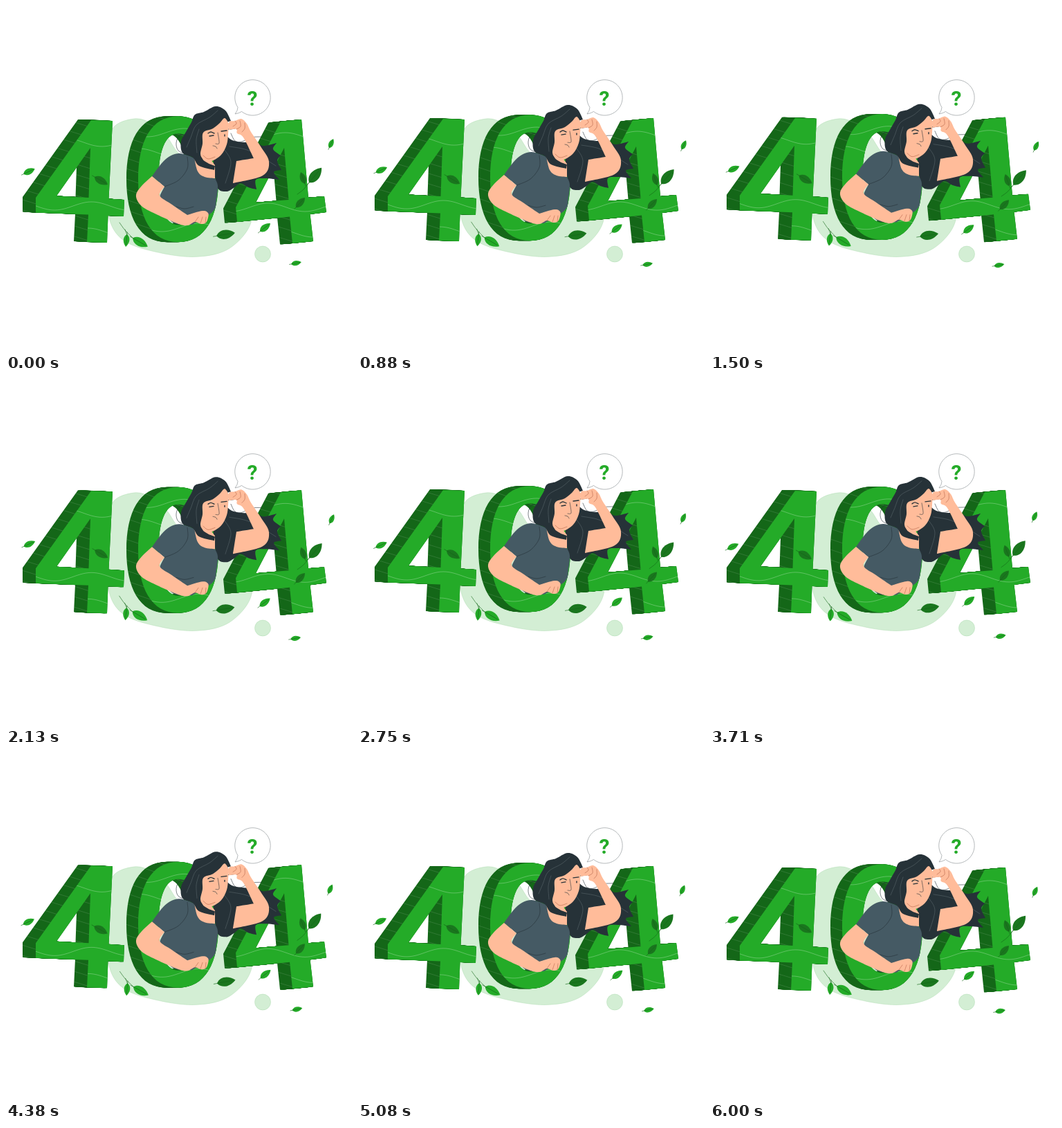
These frames come from a looping animation (500 by 500 pixels, 6040 ms). An HTML page:

```html
<!DOCTYPE html>
<html lang="en">
<head>
<meta charset="utf-8">
<title>404</title>
<style>
  html, body { margin: 0; width: 100%; height: 100%; overflow: hidden; background: #fff; }
  svg { display: block; width: 100vw; height: 100vh; }
  path { fill-rule: evenodd; clip-rule: evenodd; }
  .face { fill: #24ab28; }
  .side { fill: #146718; }
  .deep { fill: #1a761e; }
  .pale { fill: #d3eed4; stroke: #a5d6a8; stroke-width: .4; }
  .skin { fill: #ffbc9a; }
  .hair { fill: #263238; }
  .shirt { fill: #455a64; }
  .line, .brow, .wave, .grain, .shine, .crease, .stem { fill: none; stroke-width: .6; stroke-linecap: round; }
  .line { stroke: #263238; }
  .brow { stroke: #263238; stroke-width: 1.4; }
  .wave { stroke: #fff; opacity: .45; }
  .grain { stroke: #fff; opacity: .2; }
  .shine { stroke: #8b979c; opacity: .5; }
  .crease { stroke: #b5654a; }
  .stem { stroke: #146718; }
  text { font: 700 30px Roboto, sans-serif; fill: #24ab28; text-anchor: middle; }
</style>
</head>
<body>
<svg viewBox="0 0 500 500">
  <g id="back"></g>
  <circle class="pale" cx="371" cy="358.5" r="11.5"/>
  <path d="M340.500 152.500A25.700 25.700 0 1 0 335 146.500Q335 151 331 156Q337 155 340.500 152.500Z" fill="#fff" stroke="#6b7377" stroke-width=".5"/>
  <text x="356" y="143.700">?</text>
  <g id="float"></g>
  <g id="wind"></g>
</svg>
<script>
  const LOOP = 6040, RISE = 6.6;
  const [back, float, wind] = ['back', 'float', 'wind'].map(id => document.getElementById(id));

  // Smooth path through "x,y" points; "!" marks a sharp corner.
  function curve(text, closed) {
    const p = text.split(' ').flatMap(s => {
      const point = s.replace('!', '').split(',').map(Number);
      return s.endsWith('!') ? [point, point] : [point];
    });
    const n = p.length;
    const at = i => p[closed ? (i + n) % n : Math.max(0, Math.min(n - 1, i))];
    let d = `M${p[0]}`;
    for (let i = 0; i < (closed ? n : n - 1); i++) {
      const [a, b, c, e] = [at(i - 1), at(i), at(i + 1), at(i + 2)];
      if (b === c) continue;
      d += `C${b.map((v, k) => v + (c[k] - a[k]) / 6)} ${c.map((v, k) => v - (e[k] - b[k]) / 6)} ${c}`;
    }
    return d;
  }
  const path = (kind, d) => `<path class="${kind}" d="${d}"/>`;
  const shape = (kind, text) => path(kind, curve(text, true));
  const lines = (kind, ...texts) => path(kind, texts.map(t => curve(t)).join(''));

  const range = (from, to, step) =>
    Array.from({ length: Math.ceil((to - from) / step) }, (_, i) => from + i * step);

  // A digit: its face swept along (dx, dy) for depth, hatching on the side, waves on the face.
  function digit(id, d, dx, dy, left, right, rows) {
    const sweep = range(0, 1.01, .05).map(k =>
      `<path class="side" d="${d}" transform="translate(${dx * k} ${dy * k})"/>`).join('');
    const hatch = range(165, 350, 15).map(y => `M${left + dx} ${y - 20}L${right} ${y + 25}`).join('');
    const waves = rows.map(y => 'M' + range(left, right + 4, 4).map(x =>
      `${x} ${y + 6 * Math.sin((x - left) / 17 + y)}`).join('L')).join('');
    return `<clipPath id="${id}"><path d="${d}"/></clipPath>
      <clipPath id="${id}s"><path d="${d}" transform="translate(${dx} ${dy})"/></clipPath>
      ${sweep}<g clip-path="url(#${id}s)">${path('grain', hatch)}</g>
      ${path('face', d)}<g clip-path="url(#${id})">${path('wave', waves)}</g>`;
  }

  const four = 'M123 165L154 166L148.5 278.5L171 280L170 304L147.5 303L146 342L117 341L119 301.5L43 298.500V277Z' +
    'M122 205L73 274.5L119.5 277Z';
  const tilted = 'M397 167L427 164L437 277L460 275L463 298L439.5 301L444 340L414 343L410 304.5L334 312L332 291Z' +
    'M402 205L361 284L408.5 280Z';
  const oval = (x, y, rx, ry) => `M${x} ${y - ry}` + [[-1, 1], [1, -1]].map(([sx, sy]) =>
    `C${x + sx * rx * .68} ${y - sy * ry} ${x + sx * rx} ${y - sy * ry * .6} ${x + sx * rx} ${y}` +
    `S${x + sx * rx * .68} ${y + sy * ry} ${x} ${y + sy * ry}`).join('') + 'Z';
  const zero = oval(249, 250.3, 58, 91) + oval(249, 250.3, 28.5, 66);

  back.innerHTML = shape('pale',
    '185,163 211,170 232,188 248,211 275,231 325,254 354,288 350,322 318,353 270,362.5 215,355 172,340 151,313 147,270 146,220 154,177');

  float.innerHTML =
    digit('a', four, -19, -1, 43, 171, [197, 289, 327]) +
    digit('c', tilted, -18, 1.5, 332, 463, [189, 291, 328]) +
    digit('b', zero, -17, 0, 191, 307, [183, 212, 320]) +

    // hair behind the shoulder
    lines('line', '263,186 251,187 246,198 249,209 260,214', '325,184 331,195 341,196 353,190 369,189') +
    shape('hair', '315,184! 327,194 345,197 360,195 371,202 391,198! 386,207 397,216! 392,224 398,237! 387,240 395,251! 375,249 361,251 362,265! 350,262 339,256 329,263 318,268 305,261 299,218!') +
    lines('shine', '316,208 325,226 317,256', '323,203 345,207 364,215 390,231') +

    // torso
    shape('shirt', '211,246! 230,222 250,213 273,220! 279,240 302,249! 306,260 304,280 299,297 269,316! 240,312 222,282 229,261!') +
    lines('line', '229,261 249,252 262,235 262,218', '246,290 258,293 271,290') +
    shape('skin', '272,219! 277,239 287,247 302,249! 302,230! 290,214!') +

    // head
    shape('hair', '325,166! 317,151 303,145 286,153 273,157 268,168 260,182 253,196 255,212 270,219 279,231 301,237! 302,231! 290,226 283,217 288,190 310,172') +
    shape('skin', '322,170! 316,162 309,169 299,177 285,183 284,199 281,214 286,222 297,224 311,215 319,200 321,185') +
    lines('shine', '306,151 294,161 275,172 267,190 261,204', '279,178 275,193 276,212') +
    lines('line', '306,183 308,198 303,199', '299,202 303,203 305,206') +
    lines('brow', '292,184 296,182 301,184', '294,188 300,187', '311,181 319,180', '316,186 316,188', '322,178 330,177') +
    lines('crease', '285,216 292,221 302,218') +

    // raised arm
    shape('skin', '321,174! 323,167 331,166 340,163 348,170 354,182 368,203 380,225 371,245 328,256! 333,224! 358,220! 343,190 334,184 333,178 322,179!') +
    lines('crease', '331,166 333,170 328,174', '338,166 339,174 333,178', '345,169 345,177 341,182') +

    // resting arm
    shape('skin', '211,246! 196,260 188,273 193,286 207,296 247,314 262,317 273,312 282,315 289,313 292,306 292,299 284,296 262,302! 240,287 222,274 229,261!') +
    lines('crease', '273,312 278,305', '281,314 284,305', '288,314 289,305');

  // centre x, y, angle, length, kind
  const leaves = [
    [33.5, 239, -25, 18, 'face'], [174, 339, 96, 18, 'face'], [194, 341.5, 30, 25, 'face'],
    [374.5, 320, -38, 19, 'face'], [419.5, 371.5, -11, 15, 'face'], [470, 198.5, -65, 14.5, 'face'],
    [137.5, 252.5, 30, 22, 'deep'], [317.5, 330, -10, 27, 'deep'], [447, 244.5, -50, 28, 'deep'],
    [429, 248.5, -110, 18, 'deep'], [425.5, 284, -47, 19, 'deep']
  ];
  wind.innerHTML = lines('stem', '164,313 172,324 183,335', '172,323 175,331', '438,255 430,265 421,272') +
    leaves.map(([x, y, angle, size, kind]) => {
      const h = size / 2, w = size * .32;
      return `<g transform="translate(${x} ${y}) rotate(${angle})">` +
        path(kind, `M${-h} 0C${-h * .6} ${-w} ${h * .3} ${-w} ${h} 0C${h * .3} ${w} ${-h * .6} ${w} ${-h} 0Z`) +
        path('stem', `M${-h * 1.35} 0H${h * .7}`) + '</g>';
    }).join('');

  const triangle = p => 1 - Math.abs(2 * (p % 1) - 1);

  function draw() {
    const p = performance.now() % LOOP / LOOP;
    float.setAttribute('transform', `translate(0 ${-RISE * triangle(p)})`);
    wind.setAttribute('transform', `rotate(${2 * triangle(p + .25) - 1} 250 283)`);
    requestAnimationFrame(draw);
  }
  draw();
</script>
</body>
</html>
```
